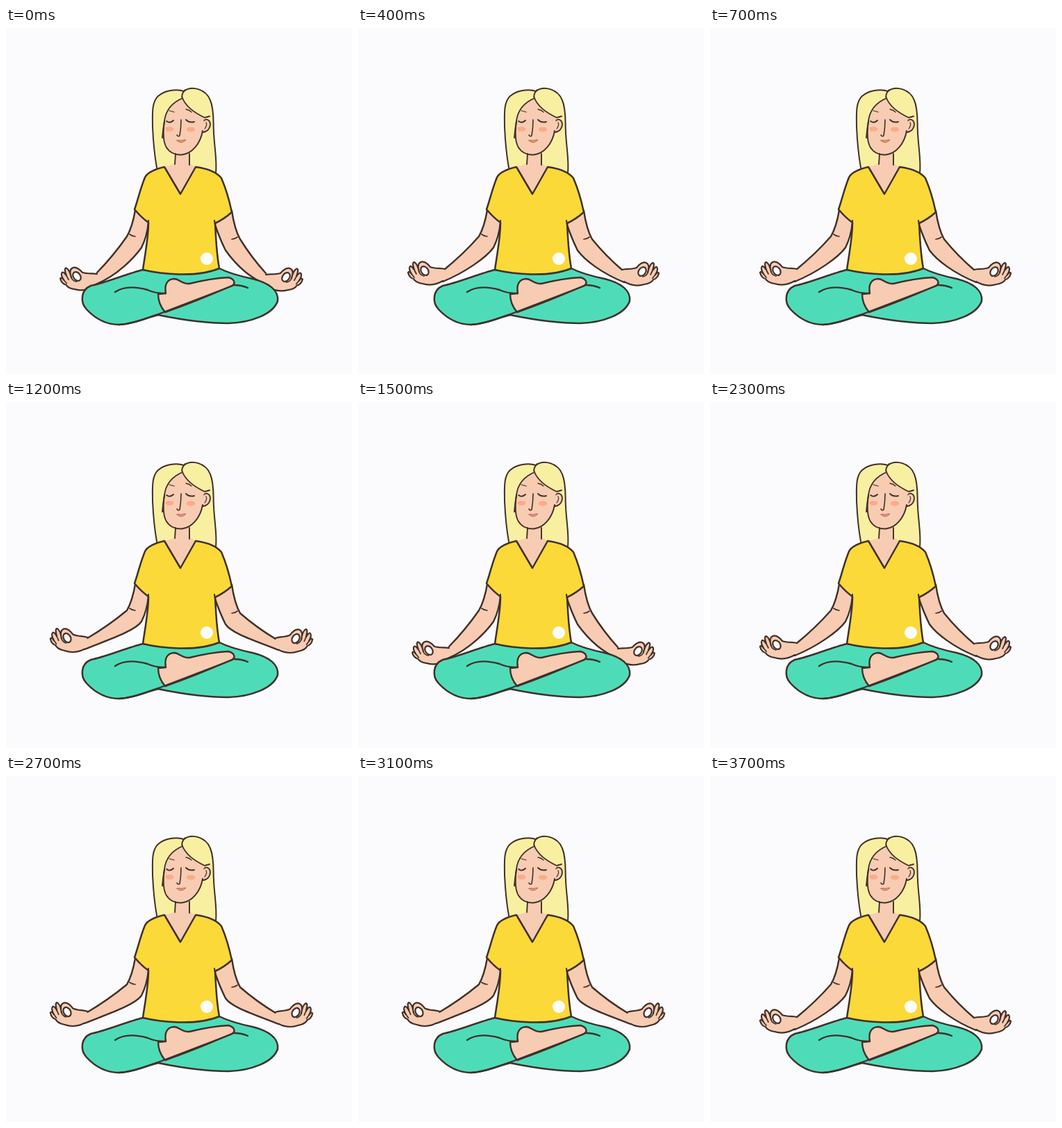
Animation, 498 px wide and 498 px high, one loop 3800 ms. Source, as an HTML page with a canvas:

```html
<!DOCTYPE html>
<html lang="en">
<head>
<meta charset="utf-8">
<title>Meditation</title>
<style>
  html, body { margin: 0; width: 100%; height: 100%; overflow: hidden; background: #fbfbfd; }
  canvas { display: block; width: 498px; height: 498px; }
</style>
</head>
<body>
<canvas id="stage" width="498" height="498"></canvas>
<script>
const ctx = document.getElementById('stage').getContext('2d');
const BG = '#fbfbfd', INK = '#40302a', SKIN = '#f8ccb2', HAIR = '#f9efa1',
      SHIRT = '#fbd938', PANTS = '#4edcb8', BLUSH = '#fbab88';
const LOOP = 3800, TICK = 100, HOLD = 118.75;

// Left arm poses: hand offset and turn, upper and lower wrist points
const LOW  = { dx: 6,  dy: 8,   turn: -0.03, top: [131, 352], low: [129, 369] };
const MID  = { dx: 0,  dy: 0,   turn: 0,     top: [125, 347], low: [122, 365] };
const HIGH = { dx: -8, dy: -10, turn: 0.06,  top: [117, 340], low: [113, 356] };
const CYCLE = [LOW, MID, HIGH, MID];

function shape(d, fill, line = 2.4, ink = INK) {
  const p = new Path2D(d);
  if (fill) { ctx.fillStyle = fill; ctx.fill(p); }
  if (line) { ctx.lineWidth = line; ctx.strokeStyle = ink; ctx.stroke(p); }
}

function oval(x, y, rx, ry, tilt, fill, line) {
  ctx.beginPath();
  ctx.ellipse(x, y, rx, ry, tilt, 0, Math.PI * 2);
  ctx.fillStyle = fill;
  ctx.fill();
  if (line) { ctx.lineWidth = line; ctx.strokeStyle = INK; ctx.stroke(); }
}

function hand(p) {
  ctx.save();
  ctx.translate(96 + p.dx, 349 + p.dy);
  ctx.rotate(p.turn);
  ctx.translate(-96, -349);
  const top = 'M125 347C119 345 112 347 104 344C100 339 95 335 90 337C86 339 86 345 88 351';
  const tips = 'C87 346 85 339 81 337C78 337 79 342 81 348C79 345 77 342 75 343C73 345 74 349 77 354C75 351 73 350 72 352C73 357 77 361 80 361';
  const palm = 'C82 365 86 367 93 368C103 371 112 370 122 364';
  shape(top + tips + palm, SKIN, 2.2);
  shape('M88 351C89 354 91 356 95 357M81 348L84 354M77 354L81 359', null, 1.7);
  oval(96, 349.5, 5, 7, -0.6, BG, 2.2);
  ctx.restore();
}

function forearm(p, ex, ey) {
  const [tx, ty] = p.top, [bx, by] = p.low;
  const x = 174 + ex, y = 300 + ey;
  const outer = `M${186 + ex} 262Q${x + 8} ${y - 14} ${x} ${y}Q${(x + tx) / 2 + 2} ${(y + ty) / 2 + 2} ${tx} ${ty}`;
  const inner = `${bx} ${by}C${bx + 32} ${by - 13} ${x + 11} ${y + 30} ${x + 21} ${y + 16}Q${x + 29} ${y} 205 280`;
  shape(`${outer}L${inner}Z`, SKIN, 0);
  shape(`${outer}M${inner}`, null);
  shape(`M${x + 4} ${y - 3}Q${x + 8} ${y} ${x + 12} ${y}`, null, 1.7);
}

function arm(p, ex, ey) {
  forearm(p, ex, ey);
  hand(p);
  // Blend the wrist into the palm
  const [tx, ty] = p.top, [bx, by] = p.low;
  shape(`M${tx + 2} ${ty + 3}L${tx - 6} ${ty + 4}L${bx - 6} ${by - 2}L${bx + 2} ${by - 4}Z`, SKIN, 0);
}

function arms(p) {
  arm(p, 0, 0);
  ctx.save();
  ctx.translate(505, 1);
  ctx.scale(-1, 1);
  arm(p, -6, 3);
  ctx.restore();
}

function hair() {
  shape('M256 91C245 87 228 90 219 98C209 107 211 126 211 143C212 165 214 184 217 203L302 210C304 190 300 174 299 150C298 136 300 118 294 104C288 88 267 82 256 91Z', HAIR, 0);
  shape('M217 201C214 184 212 165 211 143C211 126 209 107 219 98C228 90 245 87 256 91C267 82 288 88 294 104C300 118 298 136 299 150C300 174 304 190 302 209', null, 2);
}

function head() {
  shape('M244 172L243 196L228 200L251 240L274 200L265 196L264 172Z', SKIN, 0);
  shape('M284 134C287 130 293 131 294 138C294 145 289 150 283 150', SKIN, 1.8);
  shape('M288 136Q290 140 286 145', null, 1.2);
  shape('M254 101C240 107 230 117 228 134C226 149 225 164 231 172C236 180 245 184 253 183C268 181 280 166 283 148L285 129C271 122 260 113 254 101Z', SKIN, 0);
  shape('M228 134C226 149 226 164 231 172C236 180 245 183 253 182.5C268 181 280 166 283 148', null, 1.9);
  shape('M258 89C254 93 252 98 254 101C240 107 230 117 228 134Q226 146 225 158M254 101C259 113 271 122 286 129L293 127', null, 1.9);
  shape('M244 181L243 196M264 181L264 197', null, 1.9);
  oval(235.5, 145.5, 6, 3.5, 0, BLUSH);
  oval(266, 146, 6.3, 3.5, 0, BLUSH);
  shape('M231 134Q236 138 241 133M259 132Q264 137 271 135', null, 1.9);
  shape('M235 119L242 121M259 117Q264 118 267 121', null, 1.3);
  shape('M252 132Q252 144 250 155Q248 157 246 154', null, 1.6);
  shape('M246 162Q249 161 252 162Q255 161 259 161Q252 168 246 162Z', '#ef9d83', 1, '#b5654f');
}

function legs() {
  shape('M197 348C173 354 143 367 122 371C108 377 106 394 116 405C130 420 146 427 163 427C184 426 201 417 219 413C253 420 292 425 320 425C351 424 384 413 391 393C393 378 379 367 355 361C336 357 321 353 307 346Z', PANTS, 2.5);
  shape('M157 380C172 370 190 373 204 377Q214 382 230 382M328 370Q339 370 348 374', null);
  shape('M230 382C228 370 231 361 243 361C250 362 254 369 264 368C280 364 300 360 320 359C329 361 331 368 325 371C295 384 262 398 229 409C223 402 219 394 219 383Z', SKIN);
  shape('M163 427C184 426 201 418 219 412L326 371', null);
}

function shirt() {
  shape('M228 200C215 203 204 207 200 215C193 232 190 247 185 261Q195 273 205 280C205 302 200 326 197 348C222 354 274 360 307 346C303 325 302 302 301 281Q314 275 325 265C321 246 316 230 310 216C302 206 288 202 273 200L251 239Z', SHIRT, 2.5);
  shape('M205 277L205 288M300 277L302 291', null, 2);
  oval(289, 332, 9, 9, 0, '#fff');
}

function draw(t) {
  const step = Math.floor((t % LOOP) / TICK) * TICK;
  const pose = CYCLE[Math.floor(step / HOLD) % CYCLE.length];
  ctx.fillStyle = BG;
  ctx.fillRect(0, 0, 498, 498);
  ctx.lineCap = ctx.lineJoin = 'round';
  hair();
  arms(pose);
  legs();
  head();
  shirt();
}

const start = performance.now();
function loop() {
  draw(performance.now() - start);
  requestAnimationFrame(loop);
}
loop();
</script>
</body>
</html>
```
